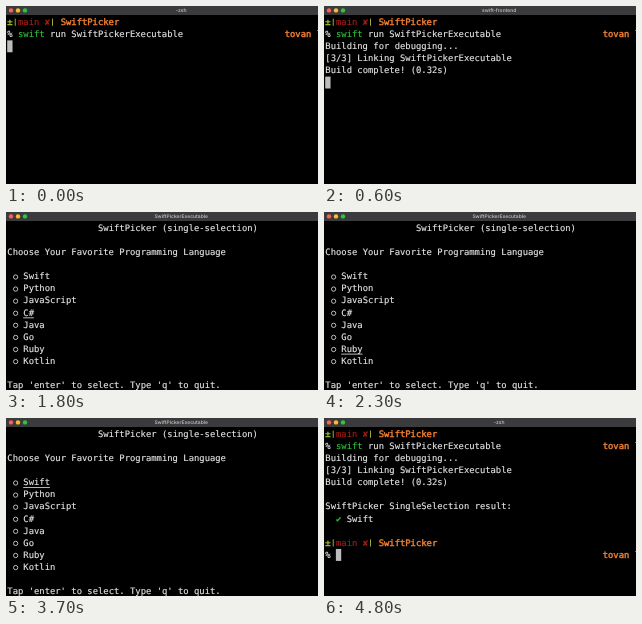
Recreate the animation shown at these times as an HTML page. Size 312 by 178 pixels, loop 5.2 s.

```html
<!DOCTYPE html>
<html lang="en">
<head>
<meta charset="utf-8">
<title>Terminal picker</title>
<style>
  html, body { margin: 0; width: 100%; height: 100%; overflow: hidden; background: #000; }
  svg { display: block; width: 100vw; height: 100vh; }
  text { white-space: pre; text-rendering: geometricPrecision; }
  #screen { font: 8.858px "DejaVu Sans Mono", "Liberation Mono", monospace; }
  #title { font: 600 4.95px Inter, "Open Sans", sans-serif; fill: #b8b8b9; text-anchor: middle; }
</style>
</head>
<body>
<svg viewBox="0 0 312 178">
  <rect width="312" height="178" fill="#000"/>
  <rect width="312" height="9" fill="#3b3b3d"/>
  <circle cx="5" cy="4.4" r="2.2" fill="#fb5f57"/>
  <circle cx="12" cy="4.4" r="2.2" fill="#fcbb2f"/>
  <circle cx="19" cy="4.4" r="2.2" fill="#2ac641"/>
  <text id="title" x="175.2" y="6"></text>
  <g id="screen"></g>
</svg>
<script>
const LOOP = 5200;
const CELL = 16 / 3, LEFT = 1.2, TOP = 10, ROW = 12.08;
const WHITE = '#e6e6e6', GREEN = '#27c436', RED = '#a51d17', ORANGE = '#f58231', YELLOW = '#b5b83a';
const THIN = 0.15, THICK = 0.4;
const APP = 'SwiftPickerExecutable';
const LANGS = ['Swift', 'Python', 'JavaScript', 'C#', 'Java', 'Go', 'Ruby', 'Kotlin'];

const screen = document.getElementById('screen');
const title = document.getElementById('title');
const colX = col => LEFT + col * CELL;
const rowY = row => TOP + row * ROW;

function add(tag, attrs, text = '') {
  const el = document.createElementNS('http://www.w3.org/2000/svg', tag);
  for (const key in attrs) el.setAttribute(key, attrs[key]);
  el.textContent = text;
  screen.append(el);
}

// Each word sits on the character grid; a fine outline sets its weight.
function put(row, col, text, fill = WHITE, outline = THIN) {
  for (const m of text.matchAll(/\S+/g)) {
    add('text', {
      x: colX(col + m.index) + 0.15, y: rowY(row) + 9,
      fill, stroke: fill, 'stroke-width': outline
    }, m[0]);
  }
}

function cursor(row, col) {
  add('rect', { x: colX(col), y: rowY(row) + 0.2, width: CELL, height: 11.9, fill: '#bdbdbd' });
}

function bar(row, col) {
  add('rect', { x: colX(col + 0.5) - 0.45, y: rowY(row) + 2.6, width: 0.9, height: 7.2, fill: YELLOW });
}

function prompt(row) {
  put(row, 0, '±', '#9ac52e', THICK);
  bar(row, 1);
  put(row, 2, 'main ✘', RED);
  bar(row, 8);
  put(row, 10, 'SwiftPicker', ORANGE, THICK);
  put(row + 1, 0, '%');
  put(row + 1, 52, 'tovan', ORANGE, THICK);
  put(row + 1, 58, 'l');
}

function shell(lines, endRow, endCol) {
  prompt(0);
  put(1, 2, 'swift', GREEN);
  put(1, 8, 'run ' + APP);
  lines.forEach((line, i) => put(2 + i, 0, line));
  cursor(endRow, endCol);
}

function build(step) {
  const lines = ['Building for debugging...'];
  if (step) lines.push(step);
  shell(lines, 3, step.length);
}

const DONE = ['Building for debugging...', `[3/3] Linking ${APP}`, 'Build complete! (0.32s)'];

function result(withPrompt) {
  shell([...DONE, '', 'SwiftPicker SingleSelection result:'], withPrompt ? 10 : 9, withPrompt ? 2 : 0);
  put(7, 2, '✔', GREEN);
  put(7, 4, 'Swift');
  if (withPrompt) prompt(9);
}

function menu(chosen) {
  put(0, 17, 'SwiftPicker (single-selection)');
  put(2, 0, 'Choose Your Favorite Programming Language');
  LANGS.forEach((name, i) => {
    const row = 4 + i;
    add('circle', { cx: colX(1.58), cy: rowY(row) + 6.7, r: 2.15, fill: 'none', stroke: WHITE, 'stroke-width': 0.8 });
    put(row, 3, name);
    if (i === chosen) {
      add('rect', { x: colX(3), y: rowY(row) + 10.9, width: name.length * CELL, height: 0.8, fill: WHITE });
    }
  });
  put(13, 0, "Tap 'enter' to select. Type 'q' to quit.");
}

// [start ms, window title, drawing]
const steps = [
  [0, '-zsh', () => shell([], 2, 0)],
  [100, '-zsh', () => build('')],
  [200, '-zsh', () => build('[0/3] Planning build')],
  [300, '-zsh', () => build(`[1/3] Emitting module ${APP}`)],
  [400, '-zsh', () => build(`[2/3] Compiling ${APP} main.swift`)],
  [500, 'swift-build', () => build(`[3/3] Linking ${APP}`)],
  [600, 'swift-frontend', () => shell(DONE, 5, 0)],
  [700, 'swift-frontend', () => menu(0)],
  ...[[1200, 0], [1300, 1], [1600, 2], [1800, 3], [1900, 4], [2100, 5], [2300, 6],
    [3100, 5], [3200, 4], [3400, 3], [3500, 2], [3600, 1], [3700, 0]
  ].map(([at, chosen]) => [at, APP, () => menu(chosen)]),
  [4600, APP, () => result(false)],
  [4700, APP, () => result(true)],
  [4800, '-zsh', () => result(true)]
];

let shown = -1;
function tick(now) {
  const t = now % LOOP;
  const index = steps.findLastIndex(([at]) => at <= t);
  if (index !== shown) {
    shown = index;
    screen.replaceChildren();
    title.textContent = steps[index][1];
    steps[index][2]();
  }
  requestAnimationFrame(tick);
}
tick(0);
</script>
</body>
</html>
```
